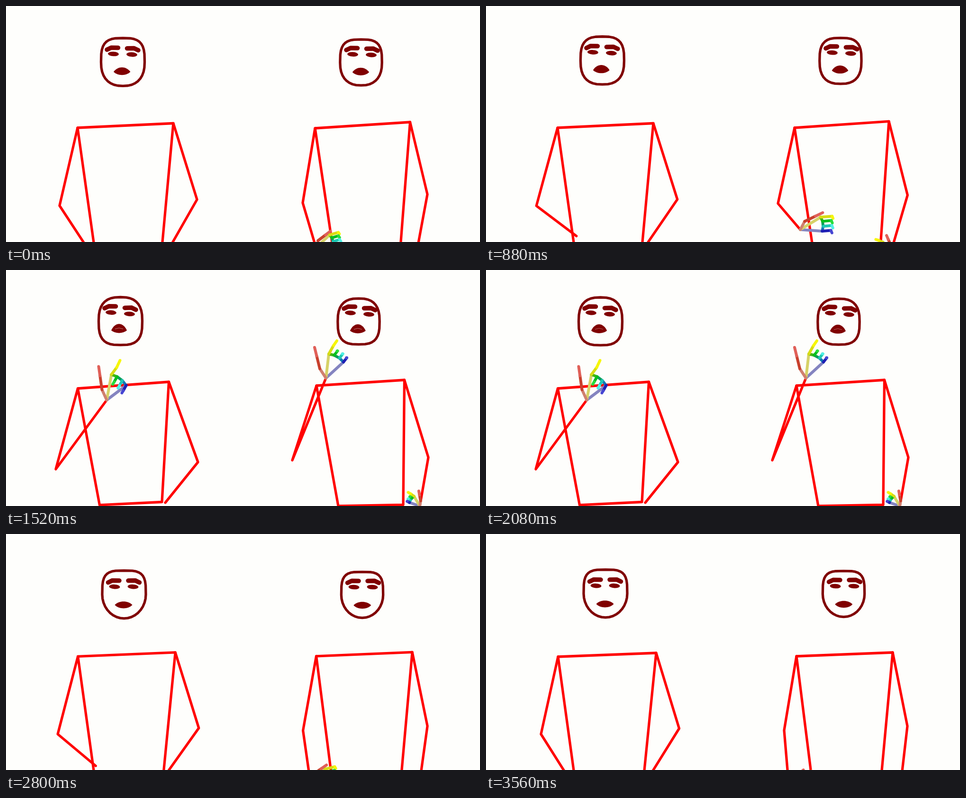
Write an HTML page with a canvas that moves like this. It is 1000 px wide and 500 px high and loops after 3.6 s.

```html
<!DOCTYPE html>
<html lang="en">
<head>
<meta charset="utf-8">
<title>Two signing figures</title>
<style>
  html, body { margin: 0; width: 100%; height: 100%; overflow: hidden; background: #fefefc; }
  canvas { display: block; width: 100vw; height: 100vh; }
</style>
</head>
<body>
<canvas id="stage" width="1000" height="500"></canvas>
<script>
const ctx = document.getElementById('stage').getContext('2d');
const LOOP = 3600, STEP = 40;
const PAPER = '#fefefc', RED = '#ff0000', DARK = '#800000';

const clamp = v => Math.max(0, Math.min(1, v));
const mix = (a, b, k) => a + (b - a) * k;
const mixPoint = (p, q, k) => p.map((v, i) => mix(v, q[i], k));
const mixAll = (a, b, k) =>
  Object.fromEntries(Object.keys(a).map(n => [n, mixPoint(a[n], b[n], k)]));
const add = (p, q) => [p[0] + q[0], p[1] + q[1]];

const easeIn = u => u * u;
const easeOut = u => u * (2 - u);
const smooth = u => u * u * (3 - 2 * u);

// Hands relative to the wrist; bend and tip are relative to each knuckle.
const fistA = { thumb: [20, -24], thumbTip: [78, -44], index: [87, -25], little: [82, 39],
  pointBend: [18, 23], pointTip: [-5, 31], bend: [17, 21], tip: [-5, 24], grip: [1, 0] };
const openA = { thumb: [-10, -22], thumbTip: [-17, -71], index: [10, -54], little: [41, -31],
  pointBend: [11, -15], pointTip: [18, -30], bend: [-6, 11], tip: [-9, 16], grip: [1, 0] };
const fistB = { thumb: [22, -18], thumbTip: [82, -21], index: [71, -11], little: [59, 30],
  pointBend: [33, 11], pointTip: [33, 18], bend: [25, 8], tip: [25, 16], grip: [1, 0] };
const openB = { thumb: [-13, -20], thumbTip: [-24, -65], index: [6, -51], little: [37, -34],
  pointBend: [10, -18], pointTip: [17, -28], bend: [7, -9], tip: [6, -9], grip: [1, 0] };
// grip is scale and turn of the whole hand
const restB = { ...fistB, grip: [.55, -.6] };
const sideLow = { ...openB, grip: [.46, -.42] };
const sideUp = { ...openB, grip: [.56, -1.1] };

// Joints: s shoulder, e elbow, w wrist, h hip; l and r are sides of the stage.
const startA = { sl: [151, 258], sr: [353, 248.5], el: [113, 423], er: [403, 410],
  wl: [177, 521], wr: [340, 521], hl: [187, 515], hr: [329, 511] };
const startB = { sl: [652, 259], sr: [852.5, 246], el: [626, 417], er: [889, 399],
  wl: [654, 512], wr: [862, 545], hl: [690, 515], hr: [832, 512] };

const figures = [
  {
    head: [246.5, 118.7], size: 1, turn: 0, settle: 3160, floor: 480,
    start: startA,
    reach: { ...startA, el: [93, 424], er: [405, 409], wl: [218, 421], wr: [329, 484] },
    high: { ...startA, sl: [151.5, 251], sr: [343.5, 237], el: [105, 422], er: [405, 407],
      wl: [212.5, 275.5], wr: [336, 493], hl: [197.5, 498], hr: [329, 491.5] },
    end: { ...startA, sl: [152, 260], sr: [359, 252], el: [116, 424], er: [407.5, 412],
      hr: [333, 511] },
    hands: { start: fistA, reach: fistA, high: openA, end: fistA }
  },
  {
    head: [749, 119.5], size: .96, turn: 2.5, settle: 2910, floor: 600,
    start: startB,
    reach: { ...startB, sl: [649, 256], sr: [845, 241], el: [596, 421], er: [890, 404],
      wl: [681, 398], wr: [841, 467] },
    high: { ...startB, sl: [655, 245], sr: [840.5, 233], el: [604, 403], er: [891, 397],
      wl: [675, 229], wr: [873, 500], hl: [701, 500], hr: [838, 497.5] },
    end: { ...startB, sl: [655, 259], sr: [858, 251], el: [629, 416], er: [889, 407],
      wl: [639, 535], wr: [873, 546], hl: [687, 515], hr: [834, 512] },
    hands: { start: restB, reach: fistB, high: openB, end: restB },
    side: { start: sideLow, reach: sideUp, high: sideLow, end: sideLow }
  }
];

// time, then shift of both heads
const nods = [[0, 0, 0], [520, 0, 0], [1200, -2, -6], [1520, -5, -10.5], [1700, -5, -16],
  [2080, -5, -10], [2800, 2.5, 9.5], [3560, 5.5, 7.5]];

// the arm rises through reach to high, holds, and sinks back the same way
function stage(t, settle) {
  const moves = [
    [440, 1200, 'start', 'reach', easeIn], [1200, 1520, 'reach', 'high', easeOut],
    [2160, 2500, 'high', 'reach', easeIn], [2500, settle, 'reach', 'end', easeOut]
  ];
  const [a, b, from, to, ease] = moves.filter(m => t >= m[0]).pop() || moves[0];
  const k = ease(clamp((t - a) / (b - a)));
  return poses => mixAll(poses[from], poses[to], k);
}

function nod(t) {
  const i = nods.findIndex((n, j) => j === nods.length - 1 || t < nods[j + 1][0]);
  const a = nods[i], b = nods[i + 1] || a;
  return mixPoint(a, b, smooth(clamp((t - a[0]) / (b[0] - a[0] || 1)))).slice(1);
}

function line(color, width, ...points) {
  ctx.strokeStyle = color;
  ctx.lineWidth = width;
  ctx.beginPath();
  points.forEach(p => ctx.lineTo(...p));
  ctx.stroke();
}

function drawBody({ sl, sr, el, er, wl, wr, hl, hr }) {
  line(RED, 5.3, wl, el, sl, sr, er, wr);
  line(RED, 5.3, sl, hl, hr, sr);
}

function drawHand(h, wrist, flip = 1) {
  const [scale, turn] = h.grip, c = Math.cos(turn) * scale, s = Math.sin(turn) * scale;
  const place = ([x, y]) => add(wrist, [x * flip * c - y * s, x * flip * s + y * c]);
  const bone = (color, ...points) => line(color, 6, ...points.map(place));
  // knuckles sit on a slight arc from index to little finger
  const knuckles = [0, 1, 2, 3].map(i => {
    const bulge = 1 + .08 * Math.sin(Math.PI * i / 3);
    return mixPoint(h.index, h.little, i / 3).map(v => v * bulge);
  });
  bone('#8484c0', [0, 0], h.little);
  bone('#d6d268', [0, 0], h.index);
  bone('#d08070', [0, 0], h.thumb);
  const joint = mixPoint(h.thumb, h.thumbTip, .6);
  bone('#c8402c', h.thumb, joint);
  bone('#e06058', joint, h.thumbTip);
  ['#46b414', '#0aa05a', '#1478b4'].forEach((color, i) => bone(color, knuckles[i], knuckles[i + 1]));
  const tints = [['#d8dc14', '#f6f60a'], ['#0abe1e', '#28dc3c'], ['#1ec8b4', '#50f0e6'], ['#1e1eb4', '#4646d2']];
  tints.forEach(([near, far], i) => {
    const k = knuckles[i];
    const mid = add(k, i ? h.bend : h.pointBend), end = add(k, i ? h.tip : h.pointTip);
    bone(near, k, mid);
    bone(far, mid, end);
  });
}

function drawOutline(a, b, tilt) {
  // rounded box; a raised head shows a wide jaw, a lowered one a narrow chin
  const points = [];
  for (let i = 0; i <= 36; i++) {
    const c = Math.cos(i * Math.PI / 18), s = Math.sin(i * Math.PI / 18);
    const power = 2 / (s < 0 ? 3.6 - tilt : 2 + tilt);
    points.push([a * Math.sign(c) * Math.abs(c) ** power, b * Math.sign(s) * Math.abs(s) ** power]);
  }
  line(DARK, 5.3, ...points);
}

function drawEye(x, y, side) {
  ctx.beginPath();
  ctx.ellipse(x, y, 11.5, 4.8, .06, 0, Math.PI * 2);
  ctx.fill();
  line(DARK, 9.5, [x + 13.5 * side, y - 9], [x + 4.5 * side, y - 13.3], [x - 10 * side, y - 13]);
}

function drawMouth(x, y, a, b, tilt) {
  const corner = y + b * .45 * tilt;
  const bow = peak => corner + (peak - corner) / .75;
  ctx.beginPath();
  ctx.moveTo(x - a, corner);
  ctx.bezierCurveTo(x - a * .5, bow(y - b), x + a * .5, bow(y - b), x + a, corner);
  ctx.bezierCurveTo(x + a * .5, bow(y + b), x - a * .5, bow(y + b), x - a, corner);
  ctx.fill();
  ctx.globalAlpha = .5 * clamp((tilt - .85) * 8);
  line(PAPER, 1, [x - a * .5, y + 1], [x, y - 1], [x + a * .5, y + 1]);
  ctx.globalAlpha = 1;
}

function drawFace({ head, size, turn }, shift) {
  const tilt = clamp(.4 - .055 * shift[1]);
  ctx.save();
  ctx.translate(...add(head, shift));
  ctx.fillStyle = DARK;
  drawOutline(46 * size, 50.7 * size, tilt);
  drawEye(turn - 20, -16.5 - 1.7 * tilt, -1);
  drawEye(turn + 19, -16.5 + 1.5 * tilt, 1);
  drawMouth(turn / 2 - 1 - 2 * tilt, 22 - 6.5 * tilt, 18.5 - 2 * tilt, 7.2 + 2.4 * tilt, tilt);
  ctx.restore();
}

function draw(t) {
  ctx.fillStyle = PAPER;
  ctx.fillRect(0, 0, 1000, 500);
  ctx.lineCap = ctx.lineJoin = 'round';
  const shift = nod(t);
  for (const fig of figures) {
    const pick = stage(t, fig.settle), body = pick(fig);
    drawBody(body);
    drawFace(fig, shift);
    if (fig.side) drawHand(pick(fig.side), body.wr, -1);
    if (body.wl[1] < fig.floor) drawHand(pick(fig.hands), body.wl);
  }
}

// only joints are blended, so the other settings stay out of the poses
const blend = stage;
stage = (t, settle) => {
  const pick = blend(t, settle);
  return poses => pick(poses);
};

const origin = performance.now();
function tick() {
  const t = (performance.now() - origin) % LOOP;
  draw(Math.floor(t / STEP) * STEP);
  requestAnimationFrame(tick);
}
tick();
</script>
</body>
</html>
```
